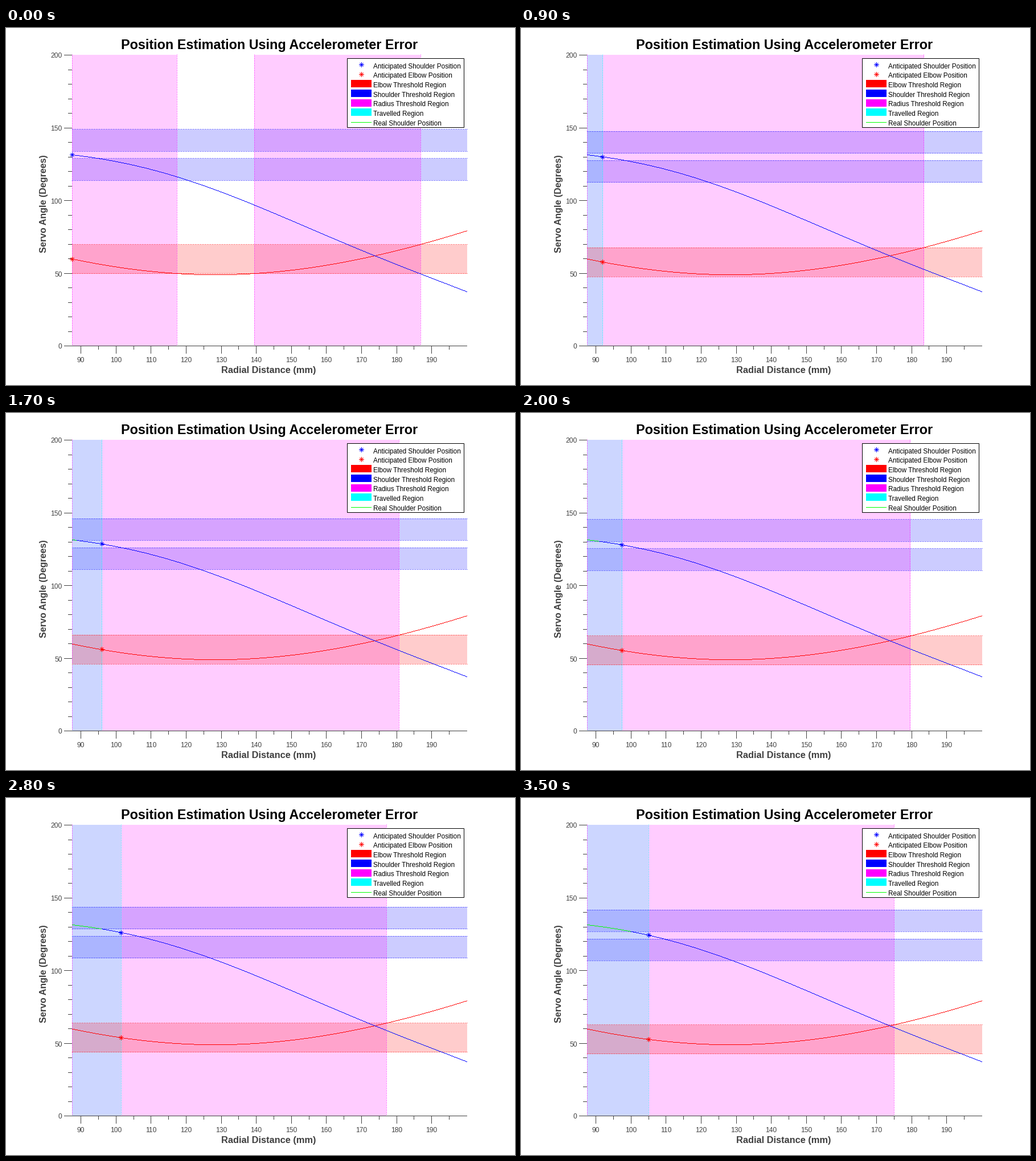
A matplotlib script for the animation above (3.6 s loop, 894 px wide and 626 px high).

```python
import numpy as np
import matplotlib.pyplot as plt
from matplotlib.animation import FuncAnimation
from matplotlib.patches import Rectangle

W, H, DPI = 894, 626, 100
PX = 72 / DPI                      # one pixel in points
FRAMES, STEP = 36, 0.5             # millimetres travelled per frame
R0, R1 = 87.5, 200
LEFT, RIGHT, TOP, BASE = 116, 810, 47, 558
GREY = "#404040"
RED, BLUE, GREEN = "#ff0000", "#0000ff", "#00ff00"
MAGENTA, CYAN = "#ff00ff", "#00ffff"

plt.rcParams["font.family"] = "Liberation Sans"
plt.rcParams["path.simplify"] = False
fig = plt.figure(figsize=(W / DPI, H / DPI), dpi=DPI, facecolor="white")
ax = fig.add_axes([0, 0, 1, 1])
ax.set_xlim(0, W)
ax.set_ylim(H, 0)
ax.axis("off")


def px(r):
    return 116.2 + (np.asarray(r) - R0) * 6.16


def py(angle):
    return 557.5 - np.asarray(angle) * 2.55


def snap(v):
    """Centre of the pixel that holds v."""
    return np.floor(v) + 0.5


def smooth(points):
    r, angle = np.array(points).T
    return np.polynomial.Polynomial.fit(r, angle, 5)


shoulder = smooth([(87.5, 131.4), (96, 128.5), (105, 124.25), (120, 114.3),
                   (130, 105.8), (140, 96.4), (150, 86.1), (160, 75.9),
                   (170, 65.7), (180, 56.1), (190, 46.5), (200, 37.3)])
elbow = smooth([(87.5, 59.8), (92, 57.6), (96, 55.9), (99, 54.75),
                (105, 52.65), (110, 51.2), (117.5, 49.8), (128, 48.93),
                (139.3, 49.8), (150, 52), (160, 55.5), (170, 59.9),
                (175, 62.7), (180.7, 65.9), (186.9, 69.8), (200, 79.1)])

radius = np.linspace(R0, R1, 4501)
columns = np.arange(LEFT, RIGHT)
column_radius = R0 + (columns + 0.5 - px(R0)) / 6.16
sh_curve, el_curve = shoulder(column_radius), elbow(column_radius)


def stroke(xs, ys, color, z, style="-"):
    return ax.plot(xs, ys, color=color, lw=PX, ls=style, zorder=z,
                   snap=False, solid_capstyle="butt",
                   dash_capstyle="butt")[0]


def dotted(color, z):
    return stroke([], [], color, z, (0, (1, 2)))


def region(color, z):
    return ax.add_patch(Rectangle((LEFT, TOP), 0, 0, fc=color, ec="none",
                                  alpha=0.2, antialiased=False, zorder=z))


def label(x, y, text, size, color="black", ha="center", **kw):
    ax.text(x, y, text, fontsize=size * PX, color=color, ha=ha,
            va="baseline", zorder=12, **kw)


def gapped(starts, ends):
    rows = [(a, b, np.nan) for a, b in zip(starts, ends)]
    return np.array(rows).ravel()


def stepped(angles, keep=slice(None)):
    """A curve as one crisp pixel per column."""
    xs, ys = columns[keep], snap(py(angles[keep]))
    return gapped(xs, xs + 1), gapped(ys, ys)


def star(x, y):
    x, y = snap(x), snap(y)
    dx, dy = np.array([4.5, 0, 3, 3]), np.array([0, 4.5, 3, -3])
    return gapped(x - dx, x + dx), gapped(y - dy, y + dy)


def hlines(ys):
    ys = snap(np.array(ys))
    return gapped([LEFT] * len(ys), [RIGHT] * len(ys)), gapped(ys, ys)


def vlines(xs):
    xs = snap(np.array(xs))
    return gapped(xs, xs), gapped([BASE] * len(xs), [TOP] * len(xs))


def draw_axes():
    for a in range(0, 201, 10):
        y = snap(py(a))
        stroke([102 if a % 50 == 0 else 109, LEFT], [y, y], GREY, 6)
        if a % 50 == 0:
            label(98.5, y + 5, str(a), 12, GREY, "right")
    stroke([LEFT, RIGHT], [snap(py(0))] * 2, GREY, 6)
    for r in range(90, 200, 5):
        x = snap(px(r))
        stroke([x, x], [BASE, 571 if r % 10 == 0 else 564], GREY, 6)
        if r % 10 == 0:
            label(x, 586.5, str(r), 12, GREY)
    label(463, 36.5, "Position Estimation Using Accelerometer Error", 23.4,
          weight="bold")
    label(461.5, 605.5, "Radial Distance (mm)", 16.4, GREY, weight="bold")
    label(71.5, 308, "Servo Angle (Degrees)", 16.1, GREY, weight="bold",
          rotation=90, rotation_mode="anchor")


def draw_legend():
    ax.add_patch(Rectangle((599.5, 53.5), 205, 121, fc="white", ec="black",
                           lw=PX, snap=False, zorder=10))
    rows = [("Anticipated Shoulder Position", BLUE, "star"),
            ("Anticipated Elbow Position", RED, "star"),
            ("Elbow Threshold Region", RED, "box"),
            ("Shoulder Threshold Region", BLUE, "box"),
            ("Radius Threshold Region", MAGENTA, "box"),
            ("Travelled Region", CYAN, "box"),
            ("Real Shoulder Position", GREEN, "line")]
    for i, (text, color, kind) in enumerate(rows):
        y = 64.5 + 16.75 * i
        label(645, y + 6, text, 11.75, ha="left")
        if kind == "star":
            stroke(*star(624, y), color, 11)
        elif kind == "box":
            ax.add_patch(Rectangle((606, np.floor(y - 6.5)), 36, 13,
                                   fc=color, ec="none", zorder=11))
        else:
            stroke([606, 642], [snap(y)] * 2, color, 11)


draw_axes()
draw_legend()

sh_bands = [region(BLUE, 0.5) for _ in range(2)]
reach = [region(MAGENTA, 1) for _ in range(2)]
travelled = region(CYAN, 2)
bands = sh_bands + [region(RED, 3)]
reach_edge, travel_edge = dotted(MAGENTA, 4), dotted(CYAN, 4)
sh_edge, el_edge = dotted(BLUE, 4), dotted(RED, 4)

stroke(*stepped(el_curve), RED, 7)
stroke(*stepped(sh_curve), BLUE, 7)
real = stroke([], [], GREEN, 8)
sh_star, el_star = stroke([], [], BLUE, 9), stroke([], [], RED, 9)


def runs(mask):
    """Start and end radius of each stretch where mask holds."""
    edge = np.diff(np.concatenate(([0], mask.astype(int), [0])))
    starts, ends = np.flatnonzero(edge == 1), np.flatnonzero(edge == -1) - 1
    return [(radius[a], radius[b]) for a, b in zip(starts, ends)]


def fill_columns(patch, x0, x1):
    patch.set_bounds(x0, TOP, x1 - x0, BASE - TOP)


def update(i):
    r = R0 + STEP * i
    s, e = shoulder(r), elbow(r)

    spans = runs(np.abs(elbow(radius) - e) <= 10)
    for k, patch in enumerate(reach):
        patch.set_visible(k < len(spans))
        if k < len(spans):
            fill_columns(patch, *px(spans[k]))
    reach_edge.set_data(*vlines([x for span in spans for x in px(span)]))

    fill_columns(travelled, LEFT, px(r))
    travel_edge.set_data(*vlines([px(r)] if i else []))

    limits = [(s + 17.5, s + 2.5), (s - 2.5, s - 17.5), (e + 10, e - 10)]
    for patch, (hi, lo) in zip(bands, limits):
        patch.set_bounds(LEFT, py(hi), RIGHT - LEFT, py(lo) - py(hi))
    sh_edge.set_data(*hlines([py(a) for pair in limits[:2] for a in pair]))
    el_edge.set_data(*hlines([py(a) for a in limits[2]]))

    real.set_data(*stepped(sh_curve, sh_curve >= s + 2.5))
    sh_star.set_data(*star(px(r), py(s)))
    el_star.set_data(*star(px(r), py(e)))
    return []


anim = FuncAnimation(fig, update, frames=FRAMES, interval=100,
                     repeat=True, repeat_delay=0, blit=False)
plt.show()
```
